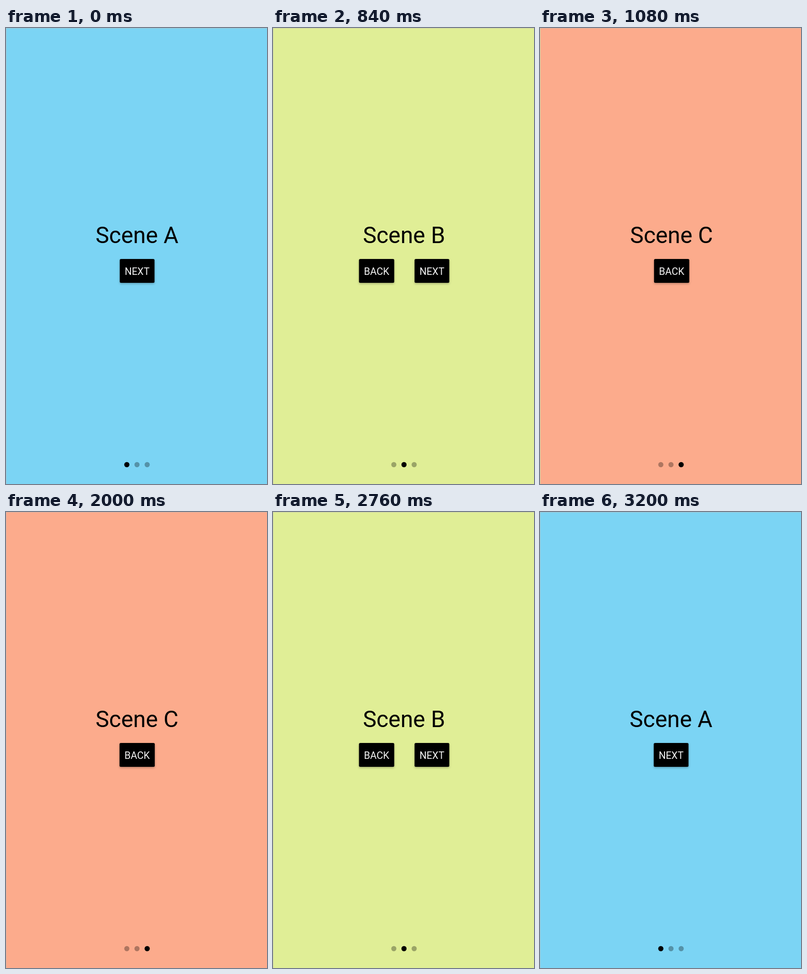
These frames come from a looping animation (526x918 px, 3.28 s). An HTML page:

```html
<!DOCTYPE html>
<html lang="en">
<head>
<meta charset="utf-8">
<title>Pager</title>
<style>
  html, body { margin: 0; width: 100%; height: 100%; overflow: hidden; background: #7bd4f4; }
  svg { display: block; width: 526px; height: 918px; }
  text { font-family: Roboto, "Liberation Sans", sans-serif; text-anchor: middle; }
  .title { font-size: 46px; }
  .label { font-size: 20px; fill: #f4f4f4; }
  .button { filter: drop-shadow(0 2px 2px rgba(0, 0, 0, .26)); }
  .edge { fill: #c4bdb6; opacity: .5; }
</style>
</head>
<body>
<svg viewBox="0 0 526 918">
  <g id="pages"></g>
  <g id="dots"></g>
  <circle id="active" cy="879" r="5.2"/>
  <rect class="edge" width="1" height="918"/>
  <rect class="edge" width="526" height="1"/>
</svg>
<script>
const WIDTH = 526, CENTER = 264, LOOP = 3280, FRAME = 40;
const GAP = 41, DOT_PITCH = 20.5;
const OMEGA = Math.sqrt(1500) / 1000; // spring stiffness 1500, per ms

const scenes = [
  { name: "Scene A", color: "#7bd4f4", buttons: ["NEXT"] },
  { name: "Scene B", color: "#e0ee96", buttons: ["BACK", "NEXT"] },
  { name: "Scene C", color: "#fcab8c", buttons: ["BACK"] }
];
const buttonWidth = { BACK: 71, NEXT: 70 };
const moves = [
  { at: 45, by: 1 },
  { at: 861, by: 1 },
  { at: 2020, by: -1 },
  { at: 2860, by: -1 }
];

const pages = document.getElementById("pages");
const dots = document.getElementById("dots");
const active = document.getElementById("active");

function add(parent, tag, attrs, text) {
  const node = document.createElementNS("http://www.w3.org/2000/svg", tag);
  for (const key in attrs) node.setAttribute(key, attrs[key]);
  if (text) node.textContent = text;
  return parent.appendChild(node);
}

const dotX = page => CENTER + (page - 1) * DOT_PITCH;

scenes.forEach(({ name, color, buttons }, i) => {
  const page = add(pages, "g", { transform: `translate(${i * WIDTH} 0)` });
  add(page, "rect", { width: WIDTH + 1, height: 918, fill: color });
  add(page, "text", { class: "title", x: CENTER, y: 433 }, name);

  const total = buttons.reduce((sum, b) => sum + buttonWidth[b], GAP * (buttons.length - 1));
  let x = CENTER + .3 - total / 2;
  for (const label of buttons) {
    const width = buttonWidth[label];
    add(page, "rect", { class: "button", x, y: 465, width, height: 48, rx: 2.5 });
    add(page, "text", { class: "label", x: x + width / 2, y: 497 }, label);
    x += width + GAP;
  }
  add(dots, "circle", { cx: dotX(i), cy: 879, r: 5.2, opacity: .31 });
});

// Critically damped spring from 0 to 1
function spring(ms) {
  if (ms <= 0) return 0;
  const a = OMEGA * ms;
  return 1 - (1 + a) * Math.exp(-a);
}

function draw(now) {
  const t = Math.floor((now % LOOP) / FRAME) * FRAME;
  const position = moves.reduce((sum, m) => sum + m.by * spring(t - m.at), 0);
  pages.setAttribute("transform", `translate(${-position * WIDTH} 0)`);
  active.setAttribute("cx", dotX(position));
}

const start = performance.now();
function tick() {
  draw(performance.now() - start);
  requestAnimationFrame(tick);
}
tick();
</script>
</body>
</html>
```
